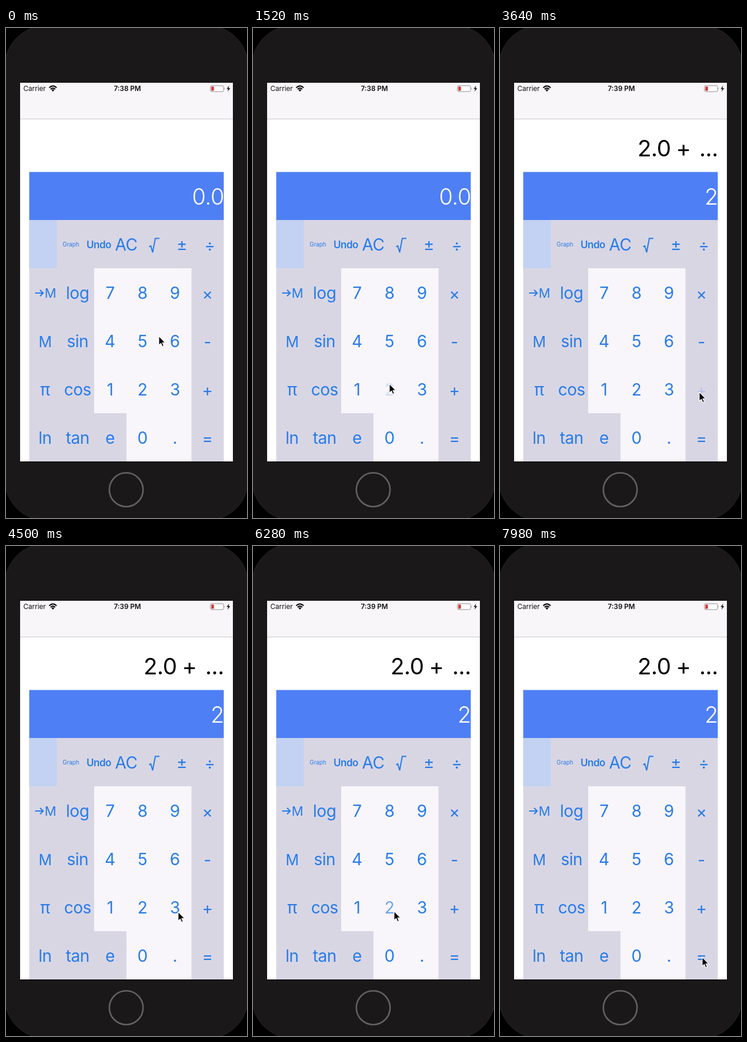
Write an HTML page that moves like this. It is 410x832 px and loops after 8000 ms.

```html
<!DOCTYPE html>
<html lang="en">
<head>
<meta charset="utf-8">
<title>Calculator</title>
<style>
  html, body { margin: 0; width: 100%; height: 100%; overflow: hidden; background: #000; }
  svg { display: block; width: 410px; height: 832px; font-family: Inter, Roboto, sans-serif; }
  #keys { fill: #277ce9; font-size: 28px; letter-spacing: -.5px; text-anchor: middle; }
  .status { font-size: 11.7px; fill: #111; }
  .clock { font-weight: 600; text-anchor: middle; }
  .value { font-size: 38px; fill: #fff; font-weight: 300; text-anchor: end; letter-spacing: -.4px; }
  .formula { font-size: 38.5px; fill: #000; letter-spacing: -.4px; }

  .anim { animation: 8s linear infinite; }
  #cursor { animation-name: move; }
  .zero { animation-name: zero; }
  .two { animation-name: two; }
  .early { animation-name: early; }
  .late { animation-name: late; }
  .formula { animation-name: formula; }
  .press2 { animation-name: press2; }
  .pressPlus { animation-name: pressPlus; }
  .zero, .two, .early, .late, .formula { animation-timing-function: step-end; }

  @keyframes move {
    0%, 3% { transform: translate(260px, 523px); animation-timing-function: ease-in-out; }
    12%, 22.5% { transform: translate(232px, 604px); animation-timing-function: ease-in-out; }
    29%, 32% { transform: translate(328px, 619px); animation-timing-function: ease-in-out; }
    37.5%, 52.3% { transform: translate(339px, 618px); animation-timing-function: ease-in; }
    56.25% { transform: translate(293px, 621px); animation-timing-function: ease-out; }
    61%, 87.5% { transform: translate(240px, 620px); animation-timing-function: ease-in-out; }
    96%, 100% { transform: translate(344px, 698px); }
  }
  @keyframes zero { 0% { opacity: 1 } 19.4%, 100% { opacity: 0 } }
  @keyframes two { 0% { opacity: 0 } 19.4%, 100% { opacity: 1 } }
  @keyframes early { 0% { opacity: 1 } 37.5%, 100% { opacity: 0 } }
  @keyframes late { 0% { opacity: 0 } 37.5%, 100% { opacity: 1 } }
  @keyframes formula { 0% { opacity: 0 } 45.1%, 100% { opacity: 1 } }
  @keyframes press2 {
    0%, 17.7% { opacity: 1; }
    17.75%, 19.4% { opacity: .2; animation-timing-function: ease-in-out; }
    24%, 74.4% { opacity: 1; }
    74.45%, 75.8% { opacity: .2; animation-timing-function: ease-in-out; }
    80.8%, 100% { opacity: 1; }
  }
  @keyframes pressPlus {
    0%, 43.9% { opacity: 1; }
    43.95%, 45.3% { opacity: .2; animation-timing-function: ease-in-out; }
    50.3%, 100% { opacity: 1; }
  }
</style>
</head>
<body>
<svg viewBox="0 0 410 832">
  <rect width="410" height="832"/>
  <rect x="-2" y="-4" width="414" height="840" rx="70" fill="#1a1819" stroke="#292728"/>
  <circle cx="204.5" cy="784" r="28.7" fill="none" stroke="#636161" stroke-width="2.6"/>

  <path fill="#000" d="M24 736h362v1H24z"/>
  <path fill="#fff" d="M24 93h362v643H24z"/>
  <path fill="#f8f6f9" d="M24 93h362v61H24z"/>
  <path fill="#cbc8cd" d="M24 154h362v1H24z"/>

  <text class="status" x="29.5" y="107">Carrier</text>
  <text class="status clock anim early" x="206.5" y="107">7:38 PM</text>
  <text class="status clock anim late" x="206.5" y="107">7:39 PM</text>
  <g fill="none" stroke="#111" stroke-width="2.1">
    <path d="M73.5 101.4Q79.8 95.2 86.1 101.4M75.9 103.9Q79.8 100.2 83.7 103.9"/>
    <path fill="#111" stroke="none" d="M77.3 105.4Q79.8 103.3 82.3 105.4L79.8 108z"/>
  </g>
  <rect x="347.8" y="98" width="22.4" height="10" rx="2.2" fill="#fff" stroke="#8f8d90"/>
  <rect x="349.3" y="99.5" width="4.4" height="7" rx=".8" fill="#d73535"/>
  <path fill="#8f8d90" d="M371.3 101.2q1.7 1.8 0 3.6z"/>
  <path fill="#111" d="M379.6 97.8l-4.2 5.7h2.7l-1.1 4.6 4.4-5.9h-2.8z"/>

  <g class="formula anim">
    <text x="234" y="218">2.0</text>
    <text x="312" y="218" text-anchor="middle">+</text>
    <text x="371" y="218" text-anchor="end">...</text>
  </g>

  <path fill="#4e7ff5" d="M39.5 244.5H370.5V326H39.5z"/>
  <text class="value anim zero" x="371" y="299.5">0.0</text>
  <text class="value anim two" x="371" y="299.5">2</text>

  <path fill="#d9d6e4" d="M39.5 326H370.5V736H39.5z"/>
  <path fill="#c3d2f2" d="M39.5 326H86.5V408H39.5z"/>
  <path fill="#f8f6fa" d="M150 408H315.5V736H205V654H150z"/>

  <g id="keys">
    <text x="110.5" y="371" style="font-size:9.8px;letter-spacing:0">Graph</text>
    <text x="158" y="374" style="font-size:17px;font-weight:600">Undo</text>
    <text x="204.5" y="378">AC</text>
    <text x="299" y="378">±</text>
    <text x="346.5" y="379">÷</text>
    <g fill="none" stroke="#277ce9" stroke-width="2">
      <path d="M243.5 371.5L246.3 370 249.5 381 254 357.3H261"/>
      <path d="M49.5 450H63M58 444.8L63.2 450 58 455.2"/>
    </g>
    <text x="75.5" y="458" style="font-size:22px">M</text>
  </g>

  <path id="cursor" class="anim" d="M0 0V15.6L3.5 12.3 5.9 17.8 8.5 16.7 6.1 11.3H11z"
        fill="#000" stroke="#fff" stroke-width="1.1" stroke-linejoin="round"/>
</svg>
<script>
  const rows = [
    ['', 'log', '7', '8', '9', '×'],
    ['M', 'sin', '4', '5', '6', '-'],
    ['π', 'cos', '1', '2', '3', '+'],
    ['ln', 'tan', 'e', '0', '.', '=']
  ];
  const pressClass = { '2': 'anim press2', '+': 'anim pressPlus' };
  const keys = document.getElementById('keys');

  rows.forEach((row, r) => row.forEach((label, c) => {
    if (!label) return;
    const key = document.createElementNS('http://www.w3.org/2000/svg', 'text');
    key.textContent = label;
    key.setAttribute('x', 66.5 + c * 55.2);
    key.setAttribute('y', 460 + r * 82 + (c === 5 ? 1 : 0));
    key.setAttribute('class', pressClass[label] || '');
    if (label === 'M') key.style.fontSize = '25px';
    keys.append(key);
  }));
</script>
</body>
</html>
```
